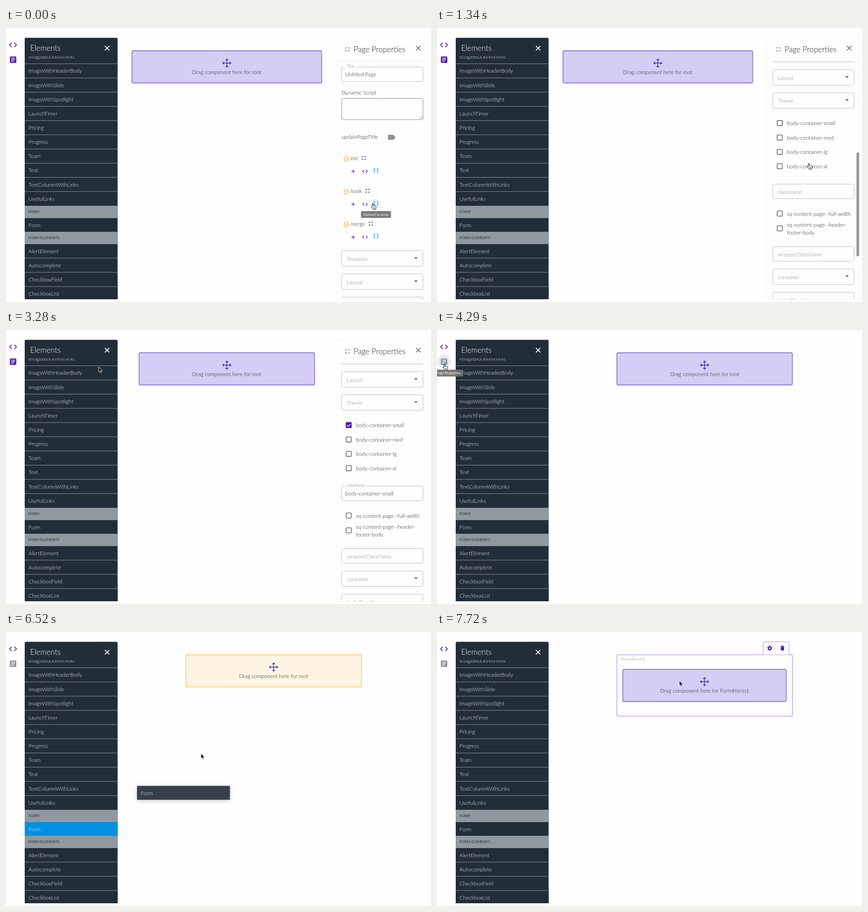
Animation, 931 px wide and 601 px high, one loop 8 s. Source, as an HTML page:

```html
<!DOCTYPE html>
<html lang="en">
<head>
<meta charset="utf-8">
<title>Page builder</title>
<style>
  html, body { margin: 0; width: 100%; height: 100%; overflow: hidden; background: #fefefe; }
  svg { display: block; width: 931px; height: 601px; }
  text { font-family: Lato, "Open Sans", sans-serif; font-weight: 300; white-space: pre; }
  #ghost { filter: drop-shadow(0 2px 5px rgba(0, 0, 0, .24)); }
</style>
</head>
<body>
<svg id="stage" viewBox="0 0 931 601" xmlns="http://www.w3.org/2000/svg"></svg>
<script>
const LOOP = 8000, TICK = 148.4, LEAD = 15;
const INK = '#1f2226', NAVY = '#212d38', PURPLE = '#4d16b0', VIOLET = '#3c28a8';
const GREY = '#858585', LINE = '#bdbdbd', BLUE = '#1a9be6', ORANGE = '#f5a32c';
const PAGE = 448; // distance the property list scrolls

// ---- drawing helpers ----
const text = (x, mid, str, fill = INK, size = 11.7, extra = '') =>
  `<text x="${x}" y="${mid + size * .36}" font-size="${size}" fill="${fill}" ${extra}>${str}</text>`;
const rect = (x, y, w, h, fill, extra = '') =>
  `<rect x="${x}" y="${y}" width="${w}" height="${h}" fill="${fill}" ${extra}/>`;
const line = (d, color, w = 1, extra = '') =>
  `<path d="${d}" fill="none" stroke="${color}" stroke-width="${w}" ${extra}/>`;
const group = (id, body, extra = '') => `<g id="${id}" ${extra}>${body}</g>`;

const cross = (x, y, r, color, w) =>
  line(`M${x - r} ${y - r}l${2 * r} ${2 * r}m0 ${-2 * r}l${-2 * r} ${2 * r}`, color, w);
const angles = (x, y, r, color, w) => {
  const a = r * .62, b = r * .38;
  return line(`M${x - b} ${y - a}L${x - r} ${y}L${x - b} ${y + a}M${x + b} ${y - a}L${x + r} ${y}L${x + b} ${y + a}`, color, w);
};
const corners = (x, y, r, color, w) => {
  const k = r * .6;
  return line([[-1, -1], [1, -1], [1, 1], [-1, 1]].map(([i, j]) =>
    `M${x + i * r} ${y + j * (r - k)}v${j * k}h${-i * k}`).join(''), color, w);
};
const moveIcon = (x, y) => line(
  `M${x - 9} ${y}h18M${x} ${y - 9}v18` +
  `M${x - 2.8} ${y - 6.2}l2.8 -2.8l2.8 2.8M${x - 2.8} ${y + 6.2}l2.8 2.8l2.8 -2.8` +
  `M${x - 6.2} ${y - 2.8}l-2.8 2.8l2.8 2.8M${x + 6.2} ${y - 2.8}l2.8 2.8l-2.8 2.8`, VIOLET, 1.4);
const dropBox = (x, y, w, label, fill = '#d5cdf4', edge = '#8b79d3') =>
  rect(x, y, w, 70.5, fill, `rx="3" stroke="${edge}" stroke-width="1.8"`) +
  moveIcon(x + w / 2, y + 27) +
  text(x + w / 2, y + 47, label, INK, 11.7, 'text-anchor="middle"');
const tip = (x, y, w, label) =>
  rect(x, y, w, 15, '#707070', 'rx="3" opacity=".92"') +
  text(x + w / 2, y + 7.6, label, '#fff', 7.7, 'text-anchor="middle" style="font-weight:400"');

// ---- property list parts ----
const field = (y, h, hint, edge = LINE) =>
  rect(735.5, y, 178, h, 'none', `rx="3" stroke="${edge}"`) + (hint ? text(746.5, y + h / 2 + .8, hint, GREY) : '');
const select = (y, hint) =>
  field(y, 34, hint) + `<path d="M894 ${y + 14.2}h8l-4 4z" fill="#666"/>`;
const floatLabel = (y, label, w) =>
  rect(742, y - 2, w, 4, '#fefefe') + text(746.5, y - 1.6, label, '#777', 8.75);
const check = (y, ...rows) =>
  rect(745.2, y - 5.6, 11.2, 11.2, 'none', 'rx="1" stroke="#555" stroke-width="1.4"') +
  rows.map((r, i) => text(766.5, y + (rows.length > 1 ? -7.5 + i * 16.5 : .5), r)).join('');
const objectRow = (y, name, ex) =>
  `<circle cx="745.5" cy="${y + 1.8}" r="5" fill="none" stroke="${ORANGE}" stroke-width="1.2"/>` +
  line(`M742.8 ${y + 1.8}h5.4`, ORANGE, 1.2) + text(754.8, y + .2, name) +
  corners(ex, y - .2, 3.5, PURPLE, 1.2) +
  line(`M756.5 ${y + 29.2}h8m-4 -4v8`, PURPLE, 1.2) + angles(786.5, y + 29.2, 5.2, PURPLE, 1.2) +
  line(`M808.6 ${y + 23}h-2v8h2M812.4 ${y + 23}h2v8h-2`, BLUE, 1.3);

// ---- left side ----
function elementsPanel() {
  const names = ['ImageBlockWithText', 'ImageWithHeaderBody', 'ImageWithSlide', 'ImageWithSpotlight', 'LaunchTimer',
    'Pricing', 'Progress', 'Team', 'Text', 'TextColumnWithLinks', 'UsefulLinks'];
  const fields = ['AlertElement', 'Autocomplete', 'CheckboxField', 'CheckboxList'];
  const row = (top, name, i) => text(49.3, top + 15.7, name, '#eef0f2') +
    (i ? line(`M41 ${top}h203.5`, '#8d969d') : '');
  const head = (top, name) => rect(41, top, 203.5, 27, '#9199a0') +
    text(49.3, top + 13.4, name, '#25303a', 8.2, 'style="font-weight:400"');
  return rect(41, 21.5, 203.5, 573.5, NAVY, 'rx="3"') + rect(41, 560, 203.5, 35, NAVY) +
    '<g clip-path="url(#listClip)">' +
    names.map((n, i) => row(47.3 + 31.15 * i, n, i)).join('') +
    head(390, 'FORM') + rect(41, 417, 203.5, 30, '#0090e3', 'id="picked"') + row(417, 'Form', 0) +
    head(447, 'FORM ELEMENTS') + fields.map((n, i) => row(473.6 + 31.15 * i, n, i)).join('') +
    '</g>' + text(53, 43.8, 'Elements', '#fff', 16.85) + cross(221.5, 44.2, 4.9, '#fff', 1.8);
}

const pageIcon = `<g id="pageIcon">${rect(8.5, 62.5, 14, 14, 'currentColor', 'rx="1.6"')}` +
  line('M11.3 66.2h8.4M11.3 69.5h8.4M11.3 72.8h5.8', '#fff', 1.4) + '</g>';

// ---- right side ----
function propsPanel() {
  const list =
    field(85.5, 32) + floatLabel(85.5, 'Title', 25) + text(743, 102, 'Untitled Page') +
    text(735, 141.5, 'Dynamic Script') + field(154.5, 46.5, '', '#8a8a8a') +
    line('M906 199.5l6 -6M909.5 199.5l2.5 -2.5', '#777', .9) +
    text(735, 239.2, 'updatePageTitle') +
    '<path d="M836 234.3h11.5q2.2 0 3.4 1.9l2.3 3.6l-2.3 3.6q-1.2 1.9 -3.4 1.9h-11.5q2 -5.5 0 -11z" fill="#919191"/>' +
    group('hover', '<circle cx="810.3" cy="385" r="10" fill="#e9f4fb"/>') +
    objectRow(285.3, 'init', 783.5) + objectRow(357.4, 'hook', 792) + objectRow(429.5, 'merge', 799) +
    select(488.5, 'Template') + select(539.5, 'Layout') + select(590, 'Theme') +
    `<g transform="translate(0 ${PAGE})">` +
    check(208.6, 'body-container-small') + check(240.2, 'body-container-med') +
    check(271.7, 'body-container-lg') + check(303.2, 'body-container-xl') +
    group('ticked', rect(744.5, 202.3, 12.6, 12.6, PURPLE, 'rx="1.4"') + line('M747 208.8l2.7 2.7l5 -5.2', '#fff', 1.5)) +
    group('classEmpty', field(342.5, 32, 'className')) +
    group('classFilled', field(342.5, 32) + floatLabel(342.5, 'className', 47) + text(743, 358.6, 'body-container-small')) +
    check(407, 'sq-content-page--full-width') + check(439.5, 'sq-content-page--header-', 'footer-body') +
    field(479.5, 32, 'wrapperClassName') + select(528.5, 'container') + field(579.5, 32, 'bodyClassName') +
    '</g>';
  return rect(722.5, 21.5, 203.5, 574, '#fefefe', 'rx="3" stroke="#f3f3f3"') +
    line('M723 72.5h203', '#eeeeee') + corners(748, 46.8, 3.8, '#666', 1.1) +
    text(761.5, 46.8, 'Page Properties', INK, 16.85) + cross(903, 44.2, 4.9, '#555', 1.4) +
    `<g clip-path="url(#propClip)">${group('list', list)}</g>` +
    rect(919, 0, 5.5, 228, '#959595', 'id="thumb" rx="2.7"');
}

// ---- dropped form ----
const toolbar =
  '<path d="M714.5 49.5v-25q0 -3 3 -3h50.500q3 0 3 3v25" fill="#fefefe" stroke="#b08bea"/>' +
  `<circle cx="728.800" cy="35.5" r="3" fill="none" stroke="${PURPLE}" stroke-width="2.300"/>` +
  `<circle cx="728.800" cy="35.5" r="4.500" fill="none" stroke="${PURPLE}" stroke-width="1.700" stroke-dasharray="2.500 2.212"/>` +
  `<path d="M753.300 32.600h6.800v6.800q0 1.200 -1.200 1.200h-4.400q-1.200 0 -1.200 -1.200zM752.500 30.700h2.300l.7 -.8h2.400l.7 .8h2.300v1.200h-8.400z" fill="${PURPLE}"/>`;
const formBox =
  rect(394, 50, 384.500, 134.500, '#fefefe', 'id="formEdge" rx="3" stroke-width="1.100"') +
  text(402, 59.800, 'Form#form1', '#9a9a9a', 10) + dropBox(407, 82, 358, 'Drag component here for Form#form1');

const ghost = group('ghost', rect(0, 0, 203.5, 30.5, '#2e3943', 'opacity=".95"') + text(8.300, 15.800, 'Form', '#eef0f2'));
const hand = '<path id="hand" d="M3.4 8.500V1.900c0-1.700 2.200-1.700 2.200 0v3.700c.3-1 1.800-.8 2 .2.500-.8 1.800-.6 2 .4.600-.5 1.900-.2 1.900 1v3.200c0 1.400-.9 2-1 3.700H5.200c-.3-1.700-2-2.800-3.600-5.200-.8-1.400.7-2.300 1.800-.4zM6.600 9.500v2.600M8.500 9.500v2.600" fill="#fff" stroke="#111" stroke-width="1" stroke-linejoin="round"/>';
const arrow = '<path id="arrow" d="M0 0v11.300l2.600-2.400 1.700 4 2-.8-1.700-3.900h3.600z" fill="#0a0a0a" stroke="#fff" stroke-width=".9"/>';

const stage = document.getElementById('stage');
stage.innerHTML =
  '<defs><clipPath id="listClip"><rect x="41" y="62" width="204" height="533"/></clipPath>' +
  '<clipPath id="propClip"><rect x="723" y="73" width="203" height="522"/></clipPath></defs>' +
  rect(0, 0, 931, 601, '#fefefe') +
  group('root', '') + group('form', formBox) + group('toolbar', toolbar) + elementsPanel() +
  angles(15.500, 37, 7.400, PURPLE, 1.700) +
  group('halo', '<circle cx="15.500" cy="69.500" r="15" fill="#e9ecee"/>') + pageIcon +
  group('props', propsPanel()) +
  group('arrayTip', tip(777.5, 401.5, 66, 'Convert to array')) + group('pageTip', tip(-7, 87, 64.5, 'Page Properties')) +
  ghost + hand + arrow;

const $ = {};
stage.querySelectorAll('[id]').forEach(el => $[el.id] = el);

// ---- motion: [step, x, y], straight between stops ----
const pointer = [[0, 799, 384], [6, 799, 384], [9, 810, 296], [11, 811, 262], [14, 807, 243], [15, 807, 222],
  [16, 807, 208], [21, 807, 208], [22, 203, 81], [24, 60, 70], [26, 12, 70], [29, 12, 74], [30, 12, 74.600],
  [32, 14, 79], [35, 110, 170], [39, 289, 340], [40, 190, 405], [41, 111, 432], [42, 111, 432], [43, 250, 372],
  [44, 427, 266.500], [45, 488, 172], [46, 503, 117], [48, 495.500, 99.500], [50, 495.500, 99.500], [52, 531, 107]];
const dragged = [[42, 41, 417], [43, 130, 396], [44, 287, 337.500], [45, 388, 210], [46, 428, 118], [47, 431, 92], [48, 426, 84]];

function along(path, n) {
  let i = 0;
  while (i < path.length - 1 && path[i + 1][0] <= n) i++;
  const a = path[i], b = path[i + 1];
  if (!b || n <= a[0]) return [a[1], a[2]];
  const k = (n - a[0]) / (b[0] - a[0]);
  return [a[1] + (b[1] - a[1]) * k, a[2] + (b[2] - a[2]) * k];
}
const place = (el, [x, y]) => el.setAttribute('transform', `translate(${x} ${y})`);
const show = (el, on) => el.setAttribute('visibility', on ? 'visible' : 'hidden');
const within = (n, a, b) => n >= a && n < b;

function rootBox(n) {
  if (n >= 49) return '';
  const x = n < 19 ? 276 : n < 27 ? 291.500 : 394;
  const w = n < 19 ? 415.500 : 384.500;
  const label = 'Drag component here for root';
  if (n >= 46) return dropBox(x, 50, w, 'Release to drop for root', '#e9f1e9', '#62c468');
  return n >= 42 ? dropBox(x, 50, w, label, '#fff4e3', '#fbd17f') : dropBox(x, 50, w, label);
}

function draw(n) {
  const scroll = PAGE * (1 - Math.pow(1 - Math.min(n / 5, 1), 2));
  place($.list, [0, -scroll]);
  $.thumb.setAttribute('y', 75 + scroll * .442);
  $.thumb.setAttribute('opacity', n < 1 ? 0 : Math.max(0, Math.min(1, (12 - n) / 2)));
  $.root.innerHTML = rootBox(n);

  show($.hover, n < 1);
  show($.arrayTip, n < 1);
  show($.ticked, n >= 19 && n < 27);
  show($.classEmpty, n < 20);
  show($.classFilled, n >= 20 && n < 27);
  $.props.style.display = n < 27 ? '' : 'none';
  $.pageIcon.style.color = n < 27 ? PURPLE : '#83959c';
  show($.halo, within(n, 25, 33));
  show($.pageTip, within(n, 26, 33));

  show($.picked, within(n, 42, 49));
  show($.ghost, within(n, 42, 49));
  place($.ghost, along(dragged, n));
  show($.form, n >= 49);
  show($.toolbar, n >= 51);
  $.formEdge.setAttribute('stroke', n >= 51 ? '#a780e8' : '#dcdcdc');

  const isHand = n < 22 || within(n, 25, 33);
  const at = along(pointer, n);
  show($.hand, isHand);
  show($.arrow, !isHand);
  place($.hand, at);
  place($.arrow, at);
}

let last = -1;
const start = performance.now();
function loop(now) {
  const n = Math.min(53, Math.floor(((Math.max(0, now - start) % LOOP) + LEAD) / TICK));
  if (n !== last) draw(last = n);
  requestAnimationFrame(loop);
}
loop(start);
</script>
</body>
</html>
```
